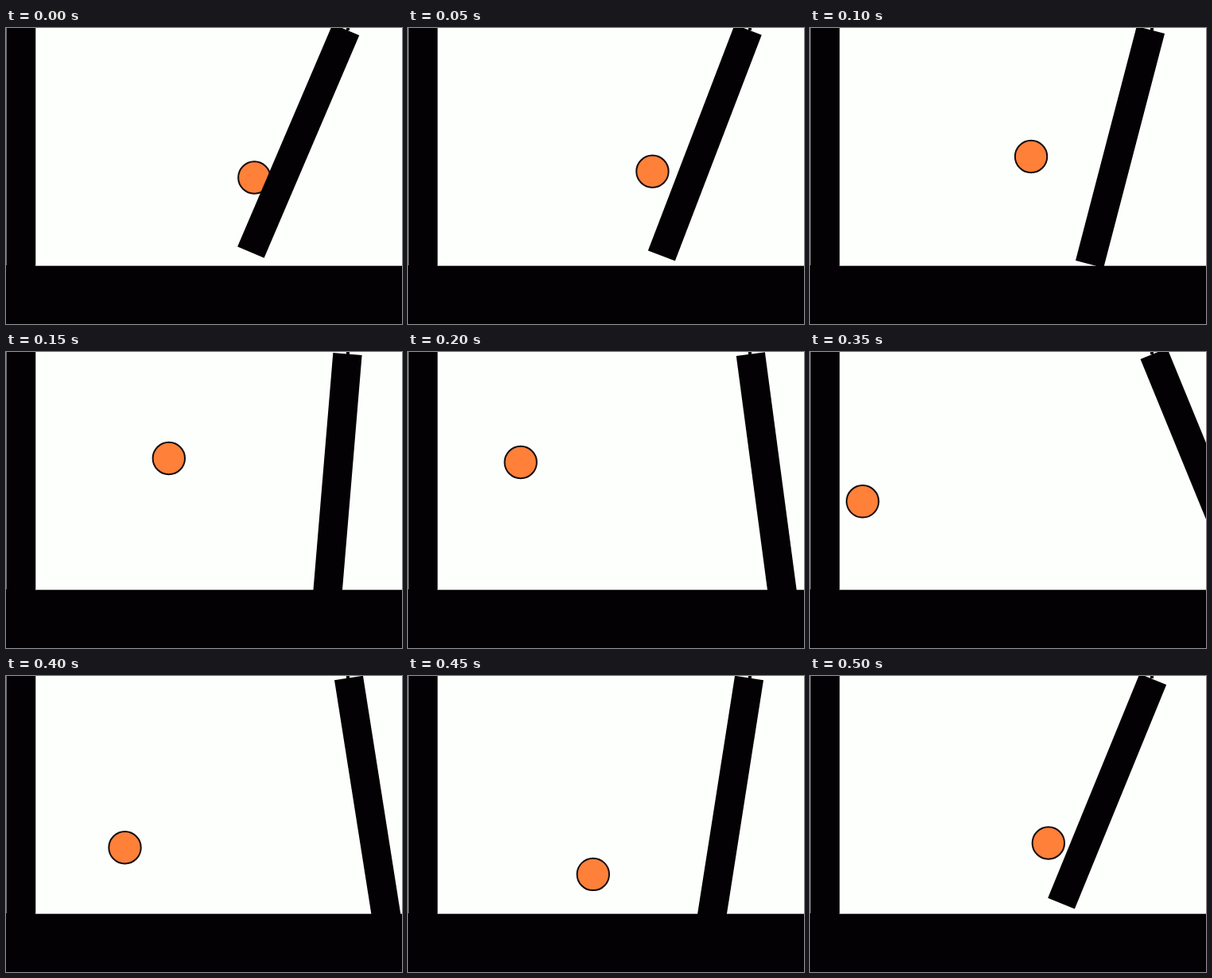
Write an HTML page that moves like this. It is 498 px wide and 373 px high and loops after 0.55 s.

```html
<!DOCTYPE html>
<html lang="en">
<head>
<meta charset="utf-8">
<title>Pendulum and ball</title>
<style>
  html, body { margin: 0; width: 100%; height: 100%; overflow: hidden; background: #fdfffc; }
  svg { display: block; width: 498px; height: 373px; }
</style>
</head>
<body>
<svg viewBox="0 0 498 373">
  <rect width="498" height="373" fill="#fdfffc"/>
  <circle id="ball" r="20.2" fill="#ff8039" stroke="#140c10" stroke-width="2"/>
  <g fill="#030104">
    <rect id="bar" x="-18.2" y="6.3" width="36.4" height="305"/>
    <rect x="428" y="-2" width="4" height="5"/>
    <rect width="37" height="300"/>
    <rect y="299.7" width="498" height="74"/>
  </g>
  <path d="M.5 0V299" stroke="#777"/>
  <path d="M37.5 0V299" stroke="#bbb"/>
</svg>
<script>
  const STEP = 50, STEPS = 11;
  const STRUCK = { x: 312.3, y: 188.5 };   // ball where the bar throws it
  const APEX = { x: 204.8, y: 134 };       // top of its flight
  const CAUGHT = { x: 232.8, y: 249 };     // where the bar lifts it again
  const WALL_X = 57;

  const ball = document.getElementById('ball');
  const bar = document.getElementById('bar');
  const mix = (a, b, k) => a + (b - a) * k;
  const easeIn = (u, p) => u ** p;
  const easeOut = (u, p) => 1 - (1 - u) ** p;

  function ballAt(t) {
    if (t < 3) {
      const u = t / 3;
      return [mix(STRUCK.x, APEX.x, easeIn(u, 2.82)), mix(STRUCK.y, APEX.y, easeIn(u, 1.78))];
    }
    if (t > 9) {
      const u = (t - 9) / 2;
      return [mix(CAUGHT.x, STRUCK.x, easeOut(u, 2.67)), mix(CAUGHT.y, STRUCK.y, easeOut(u, 1.46))];
    }
    // free fall, with a rebound off the wall
    const n = t - 3;
    const toWall = APEX.x - 63.1 * n;
    const fromWall = CAUGHT.x + 83.3 * (t - 9);
    return [Math.max(WALL_X, toWall, fromWall), APEX.y + 2.1 * n + 2.87 * n * n];
  }

  // slow swing to the right, faster swing back
  const angleAt = t => t < 6
    ? 43 * Math.cos(0.32 * t) - 19.9
    : -25 * Math.cos(0.73 * (t - 6.35));

  let start = null;

  function draw(time) {
    start ??= time;
    const t = Math.floor((time - start) / STEP) % STEPS;
    const [x, y] = ballAt(t);
    const give = Math.max(0, t - 9);       // the joint yields as the bar hits
    ball.setAttribute('transform', `translate(${x} ${y})`);
    bar.setAttribute('transform',
      `translate(${430 + 3.7 * give} ${-3.7 + 2 * give}) rotate(${angleAt(t)})`);
    requestAnimationFrame(draw);
  }

  draw(performance.now());
</script>
</body>
</html>
```
